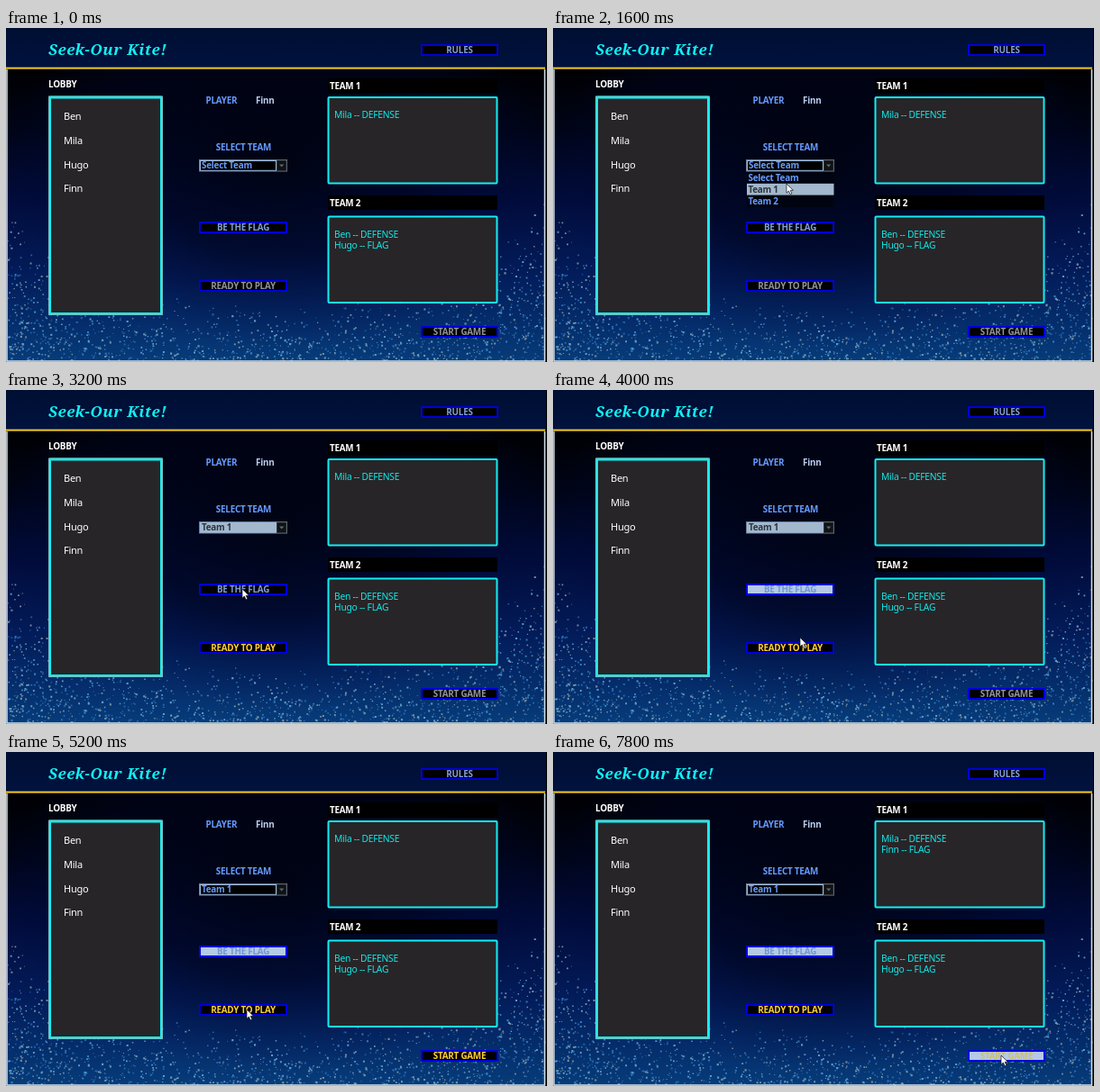
Write an HTML page that moves like this. It is 600 px wide and 371 px high and loops after 8 s.

```html
<!DOCTYPE html>
<html lang="en">
<head>
<meta charset="utf-8">
<title>Lobby</title>
<style>
html, body { margin: 0; width: 100%; height: 100%; overflow: hidden; background: #000; }
svg { display: block; width: 100%; height: 100%; }
text { font: 700 9.9px "Noto Sans", "Open Sans", sans-serif; letter-spacing: -.25px; white-space: pre; }
.list { font-weight: 400; font-size: 11px; fill: #fff; }
.row { font-weight: 400; font-size: 10.3px; fill: #12e8e8; }
.title { font: italic 900 17px "Noto Serif", serif; letter-spacing: .55px; fill: #0ff0f4; }
.mid { text-anchor: middle; }
</style>
</head>
<body>
<svg id="stage" viewBox="0 0 600 371">
  <defs>
    <linearGradient id="bar" x2="0" y2="1">
      <stop stop-color="#000e32"/><stop offset="1" stop-color="#00123e"/>
    </linearGradient>
    <linearGradient id="sky" x2="0" y2="1">
      <stop stop-color="#000002"/><stop offset=".2" stop-color="#000416"/>
      <stop offset=".45" stop-color="#010c3c"/><stop offset=".7" stop-color="#031c5a"/>
      <stop offset=".88" stop-color="#052e6c"/><stop offset="1" stop-color="#073c7a"/>
    </linearGradient>
    <radialGradient id="shade" gradientUnits="userSpaceOnUse" cx="0" cy="0" r="1"
      gradientTransform="translate(300 150) scale(300 205)">
      <stop stop-color="#00020c" stop-opacity=".75"/>
      <stop offset=".5" stop-color="#00041c" stop-opacity=".62"/>
      <stop offset="1" stop-color="#000a40" stop-opacity="0"/>
    </radialGradient>
  </defs>
</svg>
<script>
const stage = document.getElementById('stage');
const BLUE = '#669bff', SOFT = '#7f9cdc', GOLD = '#ffcf3a', GREY = '#8f949e', CYAN = '#12eef2';
const PALE = '#b4cae8', PICK = '#a3b8cc', INK = '#2c343e';

function add(tag, attrs, parent = stage) {
  const el = document.createElementNS('http://www.w3.org/2000/svg', tag);
  for (const k in attrs) el.setAttribute(k, attrs[k]);
  return parent.appendChild(el);
}
function rect(x, y, width, height, fill, more, parent) {
  return add('rect', { x, y, width, height, fill, ...more }, parent);
}
function label(x, y, str, fill, cls = '', parent) {
  const el = add('text', { x, y, class: cls }, parent);
  if (fill) el.setAttribute('fill', fill);
  el.textContent = str;
  return el;
}
const show = (el, on) => el.setAttribute('visibility', on ? 'visible' : 'hidden');

function button(x, y, w, str) {
  const face = rect(x + 1, y + 1, w - 2, 11, '#000', { stroke: '#0000dc', 'stroke-width': 2 });
  const text = label(x + w / 2, y + 10, str, GREY, 'mid');
  return (color, pressed) => {
    face.setAttribute('fill', pressed ? PALE : '#000');
    text.setAttribute('fill', color);
  };
}
function panel(x, y, w, h, line) {
  rect(x + line / 2, y + line / 2, w - line, h - line, '#272528',
    { stroke: CYAN, 'stroke-width': line, rx: 1 });
}

// Glitter gathers in the lower corners and thins out towards the centre.
function glitter() {
  let seed = 4127;
  const rnd = () => (seed = (seed * 16807) % 2147483647) / 2147483647;
  const inks = ['#3f8fd0', '#74b4dc', '#2470b8', '#8fa7a8'];
  const paths = inks.map(() => '');
  for (let i = 0; i < 8000; i++) {
    const x = 2 + rnd() * 595, y = 185 + rnd() * 184;
    const side = Math.abs(x - 300) / 300;
    const top = 306 - 122 * side ** 3;
    const depth = (y - top) / (371 - top);
    const keep = rnd(), ink = Math.floor(rnd() * 4), s = (0.8 + rnd() * 1.4).toFixed(1);
    if (depth < 0 || keep > 0.05 + 0.65 * depth) continue;
    paths[ink] += `M${x.toFixed(1)} ${y.toFixed(1)}h${s}v${s}h-${s}z`;
  }
  paths.forEach((d, i) => add('path', { d, fill: inks[i], opacity: .8 }));
}

rect(0, 0, 600, 371, '#000');
rect(0, 0, 599, 44, 'url(#bar)');
rect(0, 45, 598, 326, 'url(#sky)');
rect(0, 45, 598, 326, 'url(#shade)');
glitter();
add('path', { d: 'M1 46V370H597.5V46', fill: 'none', stroke: '#d3e2ea', 'stroke-width': 1.5 });
rect(0, 43.6, 598, 2, '#f2cb1c');

label(47, 29.5, 'Seek-Our Kite!', null, 'title');
label(47, 66, 'LOBBY', '#fff');
panel(47, 75.5, 127, 243.5, 3);
rect(47.4, 75.9, 126.2, 242.7, 'none', { stroke: '#8fb4b8', 'stroke-width': .8 });
['Ben', 'Mila', 'Hugo', 'Finn'].forEach((name, i) => label(64, 102 + i * 26.8, name, null, 'list'));

label(221.5, 84, 'PLAYER', BLUE);
label(277, 84, 'Finn', '#b9cdf0');
label(263.5, 135.5, 'SELECT TEAM', BLUE, 'mid');

rect(357, 56, 188, 16, '#000');
label(359, 67.5, 'TEAM 1', '#fff');
panel(356.5, 76, 189, 97.5, 2);
label(364, 100, 'Mila -- DEFENSE', null, 'row');
const joined = label(364, 112, 'Finn -- FLAG', null, 'row');
rect(357, 186, 188, 16, '#000');
label(359, 197.7, 'TEAM 2', '#fff');
panel(356.5, 208.5, 189, 97.5, 2);
label(364, 232.5, 'Ben -- DEFENSE', null, 'row');
label(364, 244.5, 'Hugo -- FLAG', null, 'row');

const rules = button(460, 18, 86, 'RULES');
const flag = button(214, 215, 98, 'BE THE FLAG');
const ready = button(214, 280, 98, 'READY TO PLAY');
const start = button(460, 331, 86, 'START GAME');
rules(SOFT, false);

// Team selector with its drop-down list
rect(214.5, 146.5, 97, 12.5, '#000', { stroke: '#6c7c90', 'stroke-width': 1 });
const comboFace = rect(215.5, 147.5, 84, 10.8, '#000', { stroke: '#9bbbe0', 'stroke-width': 1 });
const comboText = label(217, 156.3, '', BLUE);
rect(300.5, 147, 10.5, 11.5, '#101214', { stroke: '#3c444c', 'stroke-width': .8 });
add('path', { d: 'M303 151.5h5.4l-2.7 3z', fill: '#5d656e' });

const menu = add('g', {});
rect(215, 160, 96.5, 39, '#000410', {}, menu);
const options = ['Select Team', 'Team 1', 'Team 2'].map((str, i) => {
  const y = 160 + i * 12.8;
  return [rect(215, y, 96.5, 12.8, PICK, {}, menu), label(216.5, y + 10, str, BLUE, '', menu)];
});

const cursor = add('path', {
  d: 'M0 0V10.2L2.4 8L4.1 11.8L5.9 11L4.2 7.3H7.4Z',
  fill: '#fff', stroke: '#111', 'stroke-width': .7
});

// Pointer stops: time, x, y
const stops = [
  [200, 372, 262], [1000, 305, 154], [1200, 303, 155], [1600, 259, 173], [2000, 259, 175],
  [2400, 259, 175], [3200, 262, 221], [3600, 264, 222], [4000, 274, 275],
  [4400, 267, 286], [5200, 267, 286], [6400, 431, 313], [7200, 497, 337], [8000, 497, 337]
];
function pointer(t) {
  const i = Math.max(1, stops.findIndex(s => s[0] >= t));
  const [t0, x0, y0] = stops[i - 1], [t1, x1, y1] = stops[i];
  const p = Math.max(0, (t - t0) / (t1 - t0)), k = p * p * (3 - 2 * p);
  return [x0 + (x1 - x0) * k, y0 + (y1 - y0) * k];
}

function draw(ms) {
  const t = Math.floor((ms % 8000) / 200) * 200;
  const [x, y] = pointer(t);
  const open = t >= 1200 && t < 2000, chosen = t >= 2000, focused = chosen && t < 5200;

  show(cursor, t >= 200);
  cursor.setAttribute('transform', `translate(${x.toFixed(1)} ${y.toFixed(1)})`);

  comboText.textContent = chosen ? 'Team 1' : 'Select Team';
  comboText.setAttribute('fill', focused ? INK : BLUE);
  comboFace.setAttribute('fill', focused ? PICK : '#000');

  menu.setAttribute('display', open ? 'inline' : 'none');
  const hover = y >= 172 ? 1 : 0;
  options.forEach(([bg, text], i) => {
    bg.setAttribute('fill-opacity', i === hover ? 1 : 0);
    text.setAttribute('fill', i === hover ? INK : BLUE);
  });

  const flagDown = t >= 3400, startDown = t >= 7600;
  flag(flagDown ? '#7398d6' : SOFT, flagDown);
  ready(chosen ? GOLD : GREY, false);
  start(startDown ? '#cfc070' : t >= 5200 ? GOLD : GREY, startDown);
  show(joined, t >= 5400);
}

function tick() {
  draw(performance.now());
  requestAnimationFrame(tick);
}
tick();
</script>
</body>
</html>
```
